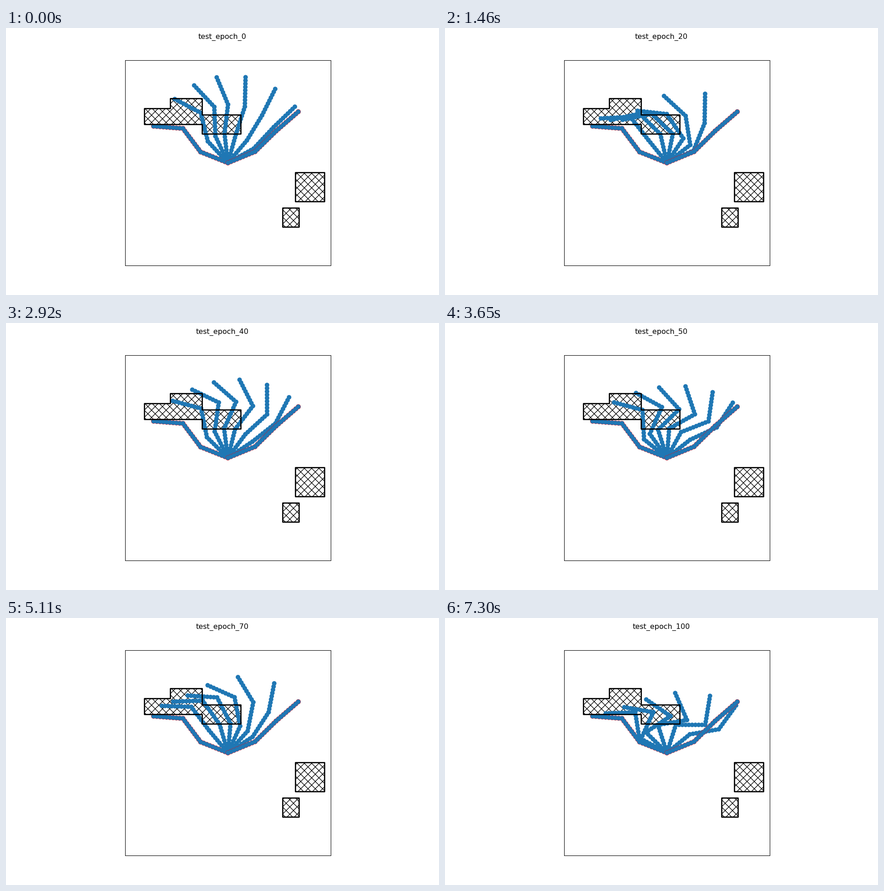
Animation of 952 by 588 pixels, one loop 8000 ms. Source, as a matplotlib script:

```python
import numpy as np
import matplotlib.pyplot as plt
from matplotlib.animation import FuncAnimation
from matplotlib.patches import Polygon

W, H, DPI = 952, 588, 96
LOOP, STEP, HOLD = 8000, 40, 730   # ms
CELL = 7 / 64                      # obstacle grid cell, in link lengths
ARMS, DOTS = 8, 10                 # arms per plan, dots per link
BLUE, RED = "#1f77b4", "red"
BLUE_SIZE, RED_SIZE = 7.5 ** 2, 8.2 ** 2

# Link angles in degrees of the fixed first and last arm
START = (158.2, 126.9, 175.6)
GOAL = (22.5, 44.5, 41)

# Key arms of a plan per epoch: second, middle and last but one
KNOTS = [0, 1, 3.5, 6, 7]
KEYS = {
    0: [(133, 104, 152), (86, 78, 101), (29, 47, 44)],
    20: [(129, 128, 183), (67, 132, 185), (25, 68, 89)],
    30: [(130, 110, 165), (77, 82, 136), (29, 52, 68)],
    50: [(141, 93, 165), (97, 36, 121), (38, 25, 57)],
    70: [(130, 127, 178), (75, 110, 168), (33, 57, 79)],
    80: [(125, 140, 193), (53, 122, 185), (17, 59, 85)],
    100: [(157, 99, 182), (123, 20, 130), (39, 10, 54)],
}


def plan(epoch):
    """Angles of all arms: a smooth curve from START to GOAL through the keys."""
    table = np.array(list(KEYS.values())).reshape(len(KEYS), -1)
    keys = [np.interp(epoch, list(KEYS), column) for column in table.T]
    knots = np.vstack([START, np.reshape(keys, (3, 3)), GOAL])
    curve = np.polyfit(KNOTS, knots, 4)
    return np.vander(np.arange(ARMS), 5) @ curve


def arm(angles):
    """Dots along a three-link arm with unit links, from base to tip."""
    t = np.linspace(0, 1, DOTS)[:, None]
    joint, parts = np.zeros(2), []
    for a in np.radians(angles):
        link = np.array([np.cos(a), np.sin(a)])
        parts.append(joint + t * link)
        joint = joint + link
    return np.vstack(parts)


def dots(epoch):
    """All dots in drawing order; the outer arms get a red copy below."""
    first, *inner, last = [arm(a) for a in plan(epoch)]
    return np.vstack([first, first, *inner, last, last])


def box(x0, y0, x1, y1):
    return [(x0, y0), (x1, y0), (x1, y1), (x0, y1)]


OBSTACLES = [
    [(-26, 12), (-26, 17), (-18, 17), (-18, 20), (-8, 20), (-8, 15),
     (4, 15), (4, 9), (-8, 9), (-8, 12)],
    box(21, -12, 30, -3),
    box(17, -20, 22, -14),
]

fig, ax = plt.subplots(figsize=(W / DPI, H / DPI), dpi=DPI)
ax.set(xlim=(-3.5, 3.5), ylim=(-3.5, 3.5), xticks=[], yticks=[], aspect="equal")
title = fig.suptitle("test_epoch_0", fontsize=12)

for cells in OBSTACLES:
    pts = np.array(cells) * CELL
    ax.add_patch(Polygon(pts, fc="none", ec="black", hatch="xx", lw=0, zorder=1))
    ax.add_patch(Polygon(pts, fill=False, ec="black", lw=2, joinstyle="round", zorder=3))

EPOCHS = [dots(e) for e in range(0, 101, 10)]
per_arm = 3 * DOTS
rim = np.repeat([True] + [False] * (ARMS - 1) + [True, False], per_arm)
arms = ax.scatter(*EPOCHS[0].T, s=np.where(rim, RED_SIZE, BLUE_SIZE),
                  c=np.where(rim, RED, BLUE), linewidths=0, zorder=2)


def update(i):
    k = min((i * STEP + STEP - 10) // HOLD, len(EPOCHS) - 1)
    arms.set_offsets(EPOCHS[k])
    title.set_text(f"test_epoch_{k * 10}")
    return arms, title


anim = FuncAnimation(fig, update, frames=LOOP // STEP, interval=STEP,
                     repeat=True, repeat_delay=0, blit=False)
plt.show()
```
